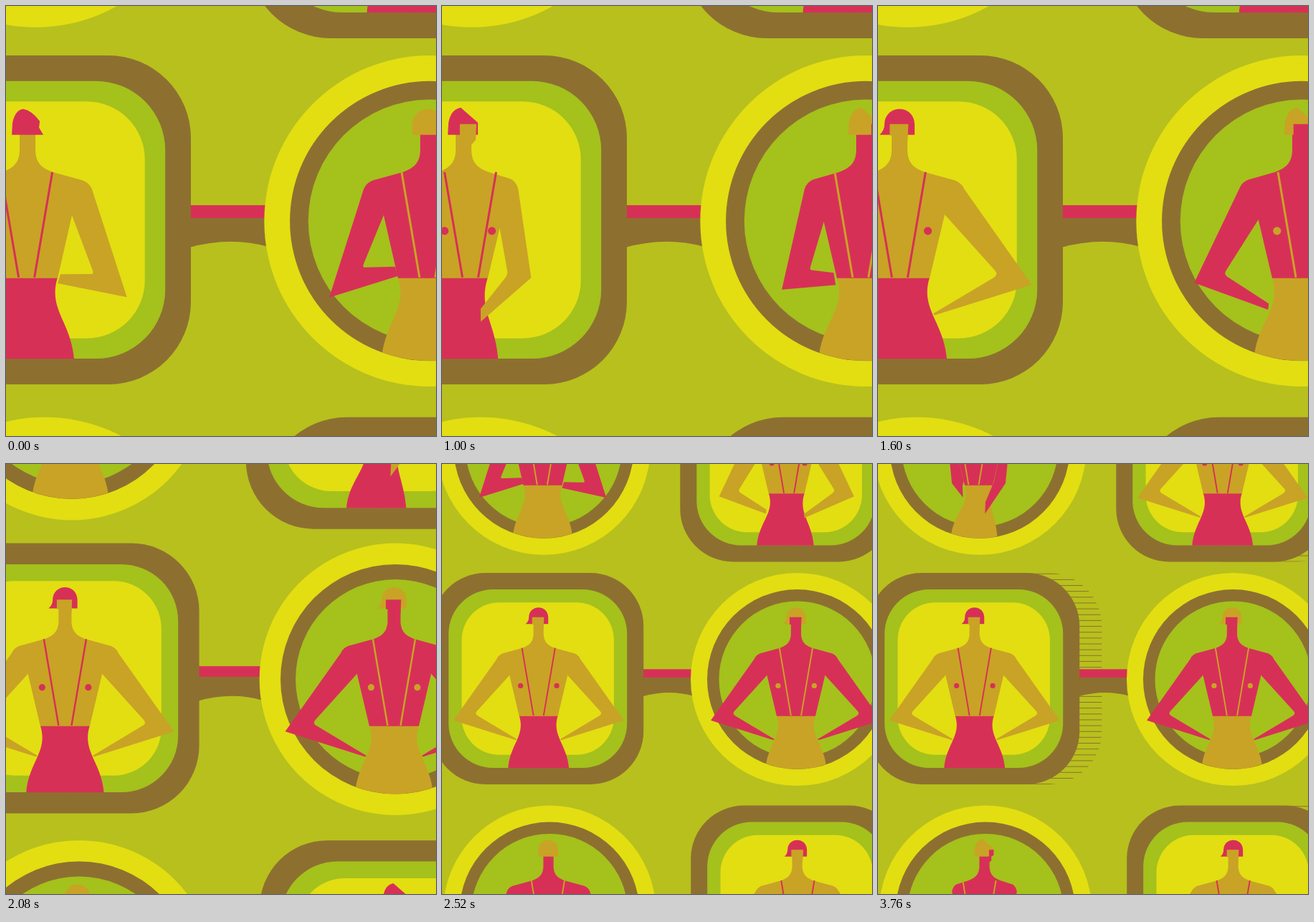
Recreate the animation shown at these times as an HTML page with a canvas. Size 600 by 600 pixels, loop 3800 ms.

```html
<!DOCTYPE html>
<html lang="en">
<head>
<meta charset="utf-8">
<title>Turning figures</title>
<style>
  html, body { margin: 0; width: 100%; height: 100%; overflow: hidden; background: #b8c01d; }
  canvas { display: block; }
</style>
</head>
<body>
<canvas id="stage" width="600" height="600"></canvas>
<script>
const ctx = document.getElementById('stage').getContext('2d');
const LOOP = 3800, STEP = 40, ZOOM = 1.5556;
const LIME = '#b8c01d', YELLOW = '#e2de12', BROWN = '#8d7030';
const GREEN = '#a5c11c', GOLD = '#c9a325', RED = '#d73057';

// start and length time the turn of the figure inside
const FRAMES = [
  { x: 142, y: -21.7, round: true, start: 2950, length: 1620 },
  { x: 479.8, y: -11, start: 1285, length: 1700 },
  { x: 133.7, y: 299.5, start: -180, length: 1900 },
  { x: 495.5, y: 300.5, round: true, start: 593, length: 1380 },
  { x: 150, y: 625, round: true, start: 2950, length: 1620 },
  { x: 494.7, y: 624, start: 1100, length: 1620 }
];

const clamp = v => Math.max(0, Math.min(1, v));
const ease = v => (1 - Math.cos(Math.PI * clamp(v))) / 2;
const mix = (a, b, k) => a + (b - a) * k;
const toward = (a, b, k) => [mix(a[0], b[0], k), mix(a[1], b[1], k)];

function fill(color, d) {
  ctx.fillStyle = color;
  ctx.fill(new Path2D(d));
}

function disc(color, x, y, r) {
  ctx.fillStyle = color;
  ctx.beginPath();
  ctx.arc(x, y, r, 0, 7);
  ctx.fill();
}

function roundSquare(x, y, half, r) {
  ctx.beginPath();
  ctx.roundRect(x - half, y - half, half * 2, half * 2, r);
}

// Half a body at turn p, from back view (0) to front view (1).
// Joints move straight between both views and narrow while seen side-on.
function halfBody(p, sign) {
  const sideOn = Math.sin(Math.PI * p) ** 2, right = sign > 0;
  const raise = right ? 0 : 9 * (1 - p);
  const joint = (back, front, narrow, drop = 0) => {
    const [x, y] = toward(back, front, p);
    return [sign * x * (1 - narrow * sideOn), y + drop * sideOn];
  };
  const wrist = joint([42, 7 - raise], [49, 53], right ? .7 : .25, right ? 33 : 0);
  return {
    sign, wrist,
    shoulder: joint([75, -136], [75, -136], .21, -3),
    upper: joint([90, -123], [90, -124], .22),
    elbow: joint([138, 28], [185, 10], .64, -22),
    hand: [wrist[0] + sign * mix(4, -2, p), wrist[1] - mix(13, 2, p) - 18 * sideOn],
    inner: joint([92, -5 - raise], [139, -4], .72),
    pit: joint([62, -87], [63, -88], .28, 27),
    waist: joint([42, 0], [42, 0], .28)[0],
    hip: joint([65, 0], [66, 0], right ? .38 : .08)[0]
  };
}

function shoulderCurve({ shoulder: s, upper: u }) {
  return `${s} Q${mix(s[0], u[0], .7)},${s[1] + 3} ${u}`;
}

function drawArm(color, s) {
  fill(color, `M${shoulderCurve(s)} L${s.elbow} L${s.wrist} L${s.hand}
    L${toward(s.inner, s.hand, .08)} Q${s.inner} ${toward(s.inner, s.pit, .07)} L${s.pit}Z`);
}

function drawTorso(color, s) {
  const g = s.sign;
  fill(color, `M${-g},-205 L${11 * g},-205 L${11 * g},-176 C${12 * g},-158 ${22 * g},-152 ${35 * g},-147
    L${shoulderCurve(s)} L${s.pit} L${s.waist},1 L${-g},1Z`);
}

function drawSkirt(color, s) {
  const g = s.sign;
  fill(color, `M${-g},0 L${s.waist},0 C${s.waist - 14 * g},44 ${s.hip - 4 * g},62 ${s.hip},114
    L${s.hip},122 L${-g},122Z`);
}

function drawHead(p, skin, cloth) {
  if (p < .02) {
    fill(cloth, 'M-22,-199 L-22,-214 C-20,-242 20,-242 21,-214 L21,-199Z');
  } else if (p < .18) {
    fill(cloth, 'M-22,-199 L-21,-216 Q-17,-234 -6,-235 Q6,-233 17,-218 L16,-209 L22,-199Z');
  } else if (p < .95) {
    fill(cloth, 'M-22,-199 L-21,-216 Q-18,-234 -4,-237 L20,-216 L20,-199Z');
  } else {
    fill(cloth, 'M-28,-199 Q-21,-205 -21,-214 C-20,-242 20,-242 21,-214 L21,-199Z');
  }
  if (p > .55) {
    const x = mix(14, -14, p), end = Math.min(x + 26, 18);
    fill(skin, `M${x},-214 L${end},-214 L${end - 1},-192 L${Math.min(11, end - 3)},-185 L${x + 3},-198 L${x},-198Z`);
  } else if (p > .18) {
    fill(skin, 'M10,-214 L20,-214 L20,-202 L15,-199 L15,-190 L8,-185 L8,-199 L10,-199Z');
  }
}

function drawFigure(f, p) {
  const [skin, cloth] = f.round ? [RED, GOLD] : [GOLD, RED];
  const left = halfBody(p, -1), right = halfBody(p, 1);
  const facing = p > .55;
  ctx.save();
  ctx.translate(f.x + (f.round ? -1.5 : 1), f.y + (f.round ? 50.7 : 51.7));
  ctx.scale(1 / ZOOM, 1 / ZOOM);

  drawArm(skin, left);
  ctx.save();
  ctx.beginPath();
  if (f.round) ctx.arc(2.3, -78.9, 195, 0, 7);
  else ctx.rect(-150, -10, 300, 123.5);
  ctx.clip();
  drawSkirt(cloth, left);
  drawSkirt(cloth, right);
  ctx.restore();
  drawTorso(skin, left);
  drawTorso(skin, right);
  drawArm(skin, right);

  const shift = facing ? 30 * (1 - p) : -1 - 20 * p;
  ctx.strokeStyle = cloth;
  ctx.lineWidth = 3;
  ctx.beginPath();
  for (const g of [-1, 1]) {
    ctx.moveTo(g * 36 + shift, -147);
    ctx.lineTo(g * 11 + shift, 0);
  }
  ctx.stroke();
  if (facing) {
    disc(cloth, -39 + 40 * (1 - p), -65, 5.6);
    disc(cloth, 39.5, -65, 5.6);
  }
  drawHead(p, skin, cloth);
  ctx.restore();
}

function drawHatch(f, offset) {
  ctx.save();
  roundSquare(f.x + offset, f.y, 147.5, 74);
  ctx.clip();
  ctx.fillStyle = BROWN;
  for (let i = 0; i <= 36; i++) ctx.fillRect(f.x, f.y - 146.8 + i * 8.15, 190, 1);
  ctx.restore();
}

function drawBridge() {
  fill(BROWN, 'M279,297 H350 V323.5 Q316,314 279,324.5Z');
  ctx.fillStyle = RED;
  ctx.fillRect(279, 286.3, 71, 11.6);
}

function drawFrame(f) {
  if (f.round) {
    disc(YELLOW, f.x, f.y, 148.5);
    disc(BROWN, f.x, f.y, 125.5);
    disc(GREEN, f.x, f.y, 109);
    return;
  }
  for (const [color, half, r] of [[BROWN, 147.5, 74], [GREEN, 124.5, 62], [YELLOW, 106.2, 52]]) {
    ctx.fillStyle = color;
    roundSquare(f.x, f.y, half, r);
    ctx.fill();
  }
}

function draw(t) {
  const zoom = mix(ZOOM, 1, ease((t - 1640) / 880));
  const hatch = 31 * clamp((t - 3640) / 120);
  ctx.setTransform(1, 0, 0, 1, 0, 0);
  ctx.fillStyle = LIME;
  ctx.fillRect(0, 0, 600, 600);
  ctx.translate(323, 301.4);
  ctx.scale(zoom, zoom);
  ctx.translate(-323, -301.4);
  if (hatch) FRAMES.filter(f => !f.round).forEach(f => drawHatch(f, hatch));
  drawBridge();
  for (const f of FRAMES) {
    drawFrame(f);
    drawFigure(f, ease((t - f.start) / f.length));
  }
}

const begin = performance.now();
function tick() {
  const t = (performance.now() - begin) % LOOP;
  draw(Math.floor(t / STEP) * STEP);
  requestAnimationFrame(tick);
}
tick();
</script>
</body>
</html>
```
